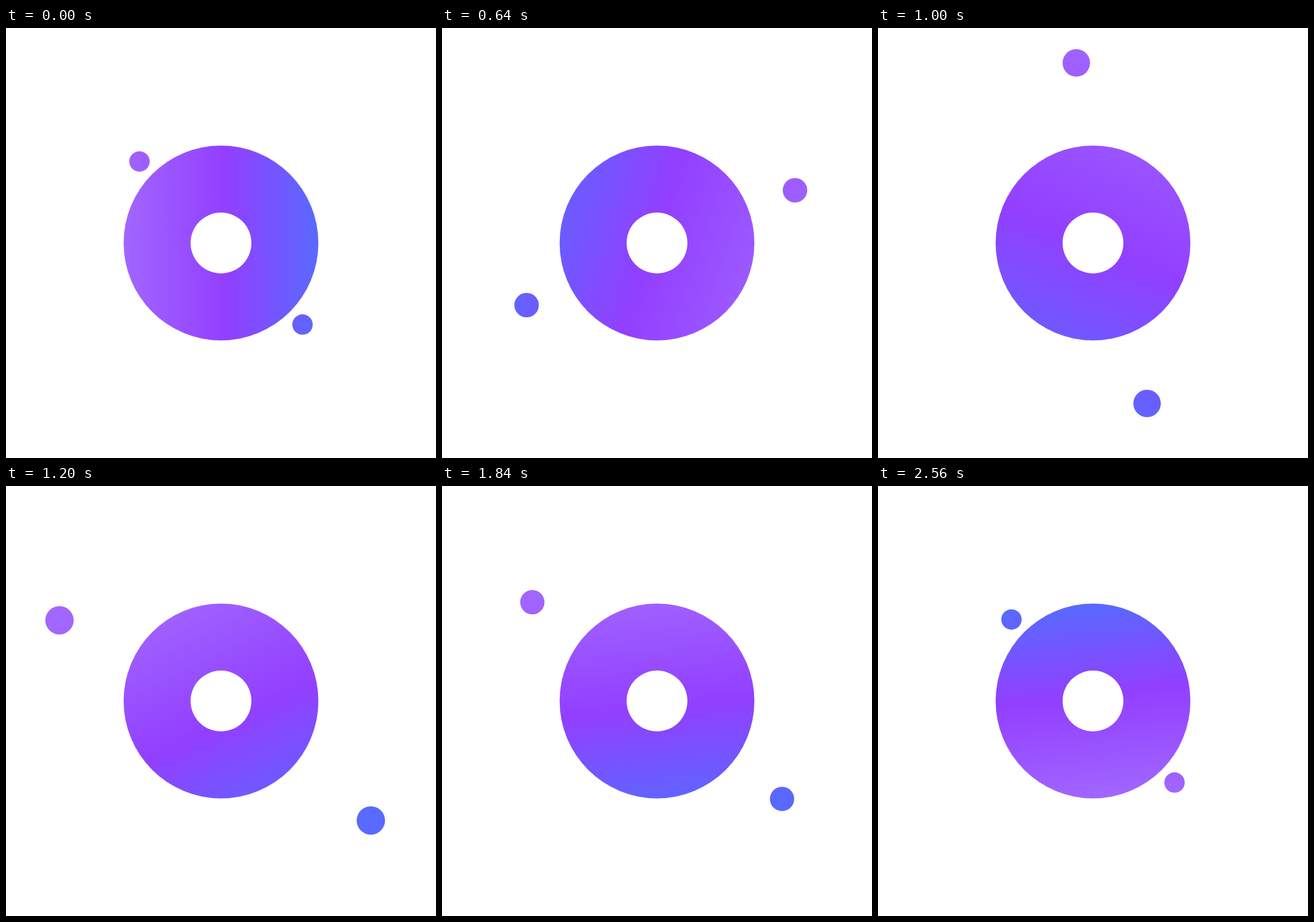
Animation of 748x748 px, one loop 2.6 s. Source, as an HTML page with a canvas:

```html
<!DOCTYPE html>
<html lang="en">
<head>
<meta charset="utf-8">
<title>Orbiting dots</title>
<style>
  html, body { margin: 0; width: 100%; height: 100%; overflow: hidden; background: #fff; }
  canvas { display: block; width: 100vmin; height: 100vmin; }
</style>
</head>
<body>
<canvas id="stage"></canvas>
<script>
const SIZE = 748, LOOP = 2600, C = 374, RING = 169.4, HOLE = 52.9;

const canvas = document.getElementById('stage');
const ctx = canvas.getContext('2d');
const ratio = window.devicePixelRatio || 1;
canvas.width = canvas.height = SIZE * ratio;

const rad = deg => deg * Math.PI / 180;

// Runs 0 to 1: a power-in up to (mid, level), then a power-out until end.
function ease(t, mid, end, level, powIn, powOut) {
  const x = Math.min(Math.max(t, 0), end);
  return x < mid
    ? level * (x / mid) ** powIn
    : 1 - (1 - level) * ((end - x) / (end - mid)) ** powOut;
}

// Two full turns.
const turn = t => 720 * ease(t, 820, 2085, 0.322, 2.96, 2.6);

// Distance from the middle of the pair: out, then back in.
const reach = t => 200.6 + 129 *
  (ease(t, 640, 1340, 0.412, 1.6, 1.42) - ease(t - 1340, 500, 930, 0.41, 1.06, 1.2));

const dotSize = t => 17.75 + 7 *
  (ease(t, 640, 1250, 0.51, 2, 1.6) - ease(t - 1250, 590, 1010, 0.51, 1.13, 1.4));

// The pair drifts off centre while it spins fast.
const drift = t => 38.5 * Math.exp(-(((t - 1085) / 275) ** 2) / 2);

// The gradient turns one way, then swings back.
const tint = t => 360 * (Math.abs(t / 1462 - 1) ** 1.09 - 1);

function circle(x, y, r) {
  ctx.moveTo(x + r, y);
  ctx.arc(x, y, r, 0, Math.PI * 2);
}

// Centre and length, on one axis, of the box around ring and dots.
function span(mid, half) {
  const low = Math.min(C - RING, mid - half), high = Math.max(C + RING, mid + half);
  return [(low + high) / 2, high - low];
}

function draw(t) {
  const angle = rad(turn(t) - 135), dist = reach(t), r = dotSize(t);
  const mx = C + drift(t) * Math.cos(angle + rad(74));
  const my = C + drift(t) * Math.sin(angle + rad(74));
  const dx = dist * Math.cos(angle), dy = dist * Math.sin(angle);

  ctx.setTransform(ratio, 0, 0, ratio, 0, 0);
  ctx.fillStyle = '#fff';
  ctx.fillRect(0, 0, SIZE, SIZE);
  ctx.beginPath();
  circle(C, C, RING);
  circle(C, C, HOLE);
  circle(mx + dx, my + dy, r);
  circle(mx - dx, my - dy, r);

  // One gradient, stretched over the box of all shapes.
  const [cx, width] = span(mx, Math.abs(dx) + r * 1.3);
  const [cy, height] = span(my, Math.abs(dy) + r * 1.3);
  ctx.translate(cx, cy);
  ctx.scale(width, height);
  ctx.rotate(rad(tint(t)));
  const fill = ctx.createLinearGradient(-0.5, 0, 0.5, 0);
  fill.addColorStop(0, '#a166ff');
  fill.addColorStop(0.53, '#923fff');
  fill.addColorStop(1, '#586aff');
  ctx.fillStyle = fill;
  ctx.fill('evenodd');
}

const start = performance.now();
function frame() {
  draw((performance.now() - start) % LOOP);
  requestAnimationFrame(frame);
}
frame();
</script>
</body>
</html>
```
